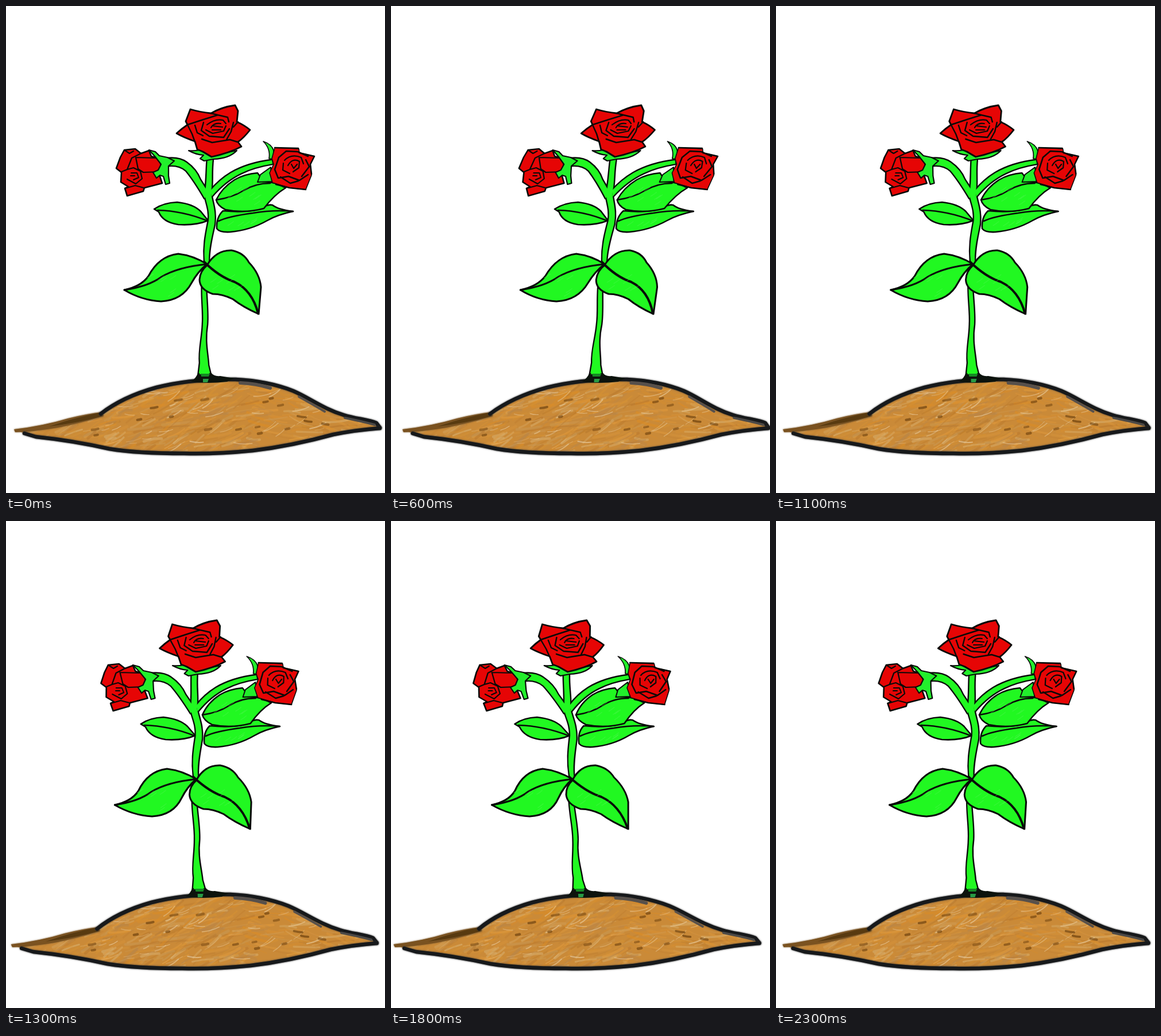
An HTML page with a canvas for the animation above (2400 ms loop, 660 px wide and 849 px high).

```html
<!DOCTYPE html>
<html lang="en">
<head>
<meta charset="utf-8">
<title>Swaying roses</title>
<style>
html, body { margin: 0; width: 100%; height: 100%; overflow: hidden; background: #fff; }
canvas { display: block; }
</style>
</head>
<body>
<canvas id="stage" width="660" height="849"></canvas>
<script>
const ctx = document.getElementById('stage').getContext('2d');
const W = 660, H = 849, LOOP = 2400, STEP = 100;
const GREEN = '#21f821', SEPAL = '#22ee2c', RED = '#e60505', INK = '#080a08';

// Sideways lean over time: [ms, shear]
const sway = [[0, 0], [300, .0393], [500, .0545], [600, .0545], [900, .014],
  [1300, -.047], [1700, -.088], [1800, -.086], [2300, -.0235]];

function key(i) {
  const n = sway.length, turn = Math.floor(i / n), [t, v] = sway[i - turn * n];
  return [t + turn * LOOP, v];
}

function slope(i) {
  const a = key(i - 1), b = key(i + 1);
  return (b[1] - a[1]) / (b[0] - a[0]);
}

function lean(t) {
  let i = 0;
  while (key(i + 1)[0] <= t) i++;
  const [t0, v0] = key(i), [t1, v1] = key(i + 1);
  const d = t1 - t0, u = (t - t0) / d, w = 1 - u;
  return v0 * w * w * (1 + 2 * u) + slope(i) * d * u * w * w
    + v1 * u * u * (3 - 2 * u) - slope(i + 1) * d * u * u * w;
}

function random(seed) {
  return () => (seed = (seed * 16807) % 2147483647) / 2147483647;
}

function stroke(d, width = 3, color = INK) {
  ctx.strokeStyle = color;
  ctx.lineWidth = width;
  ctx.stroke(new Path2D(d));
}

function fill(d, color) {
  ctx.fillStyle = color;
  ctx.fill(new Path2D(d));
}

function shape(d, color, width = 3) {
  fill(d, color);
  stroke(d, width);
}

function dash(x, y, len, angle, bend) {
  const c = Math.cos(angle) * len / 2, s = Math.sin(angle) * len / 2;
  ctx.beginPath();
  ctx.moveTo(x - c, y - s);
  ctx.quadraticCurveTo(x - s * bend, y + c * bend, x + c, y + s);
  ctx.stroke();
}

const ridge = 'M165 711 C192 690 222 676 262 665 C300 655 345 650 400 651 ' +
  'C440 653 470 659 500 671 C530 684 552 702 588 713 C610 720 632 721 645 727 L651 735';
const belly = 'M651 736 C625 738 600 741 570 747 C530 758 480 769 430 775 ' +
  'C390 779 350 781 310 780 C260 780 210 777 180 772 C140 763 100 756 52 751 L32 745';
const soil = 'M18 740 C65 731 105 720 165 711 ' + ridge.slice(8) + ' ' +
  belly.replace('M', 'L') + ' Z';
const clods = [[288, 716], [352, 738], [346, 686], [452, 690], [478, 696], [462, 684], [405, 738],
  [438, 734], [442, 745], [490, 737], [515, 716], [526, 724], [556, 729], [155, 738], [157, 748],
  [232, 721], [258, 700], [300, 687]];
const tints = ['#dc8c25', '#d69232', '#b9792d', '#c99a57', '#b7854a', '#e09a3c', '#d8b070'];

function mound() {
  const rnd = random(417);
  ctx.save();
  fill(soil, '#ca8a38');
  ctx.clip(new Path2D(soil));
  for (let i = 0; i < 620; i++) {
    const x = 30 + rnd() * 620, y = 655 + rnd() * 125;
    const tilt = x < 430 ? -.42 : .16;
    ctx.strokeStyle = tints[Math.floor(rnd() * tints.length)];
    ctx.globalAlpha = .2 + rnd() * .4;
    ctx.lineWidth = 1.5 + rnd() * 3.5;
    dash(x, y, 14 + rnd() * 34, tilt + (rnd() - .5) * .7, (rnd() - .5) * .5);
  }
  ctx.strokeStyle = '#f0dab4';
  for (let i = 0; i < 65; i++) {
    ctx.globalAlpha = .2 + rnd() * .35;
    ctx.lineWidth = .8 + rnd() * 1.4;
    dash(170 + rnd() * 400, 665 + rnd() * 107, 10 + rnd() * 22, -.3 + (rnd() - .5) * .9, .2);
  }
  ctx.strokeStyle = '#70430f';
  for (const [x, y] of clods) {
    ctx.globalAlpha = .5 + rnd() * .25;
    ctx.lineWidth = 3.5 + rnd() * 1.5;
    dash(x, y, 4 + rnd() * 11, x > 500 ? .15 : -.18, .1);
  }
  ctx.restore();

  ctx.save();
  ctx.shadowColor = '#7a5a30';
  ctx.shadowBlur = 3;
  fill('M14 738 Q65 732 108 719 Q140 711 168 708 L170 715 Q130 727 90 735 Q50 742 16 743 Z', '#7a5220');
  fill('M75 733 Q120 717 168 708 L168 715 Q125 727 75 733 Z', '#583a10');
  ctx.shadowColor = '#333';
  stroke(ridge, 6.5, '#17191b');
  stroke(belly, 6.5, '#17191b');
  ctx.restore();
  stroke('M408 657 Q435 658 460 666', 6, '#57504b');
  stroke('M510 681 Q535 695 555 707', 4, '#57504b');
  stroke('M590 718 Q620 724 642 730', 4, '#4b4947');
}

function sheen(x, y, w, h, n) {
  const rnd = random(x * 7 + y);
  ctx.strokeStyle = '#62f562';
  ctx.globalAlpha = .3;
  ctx.lineWidth = 1.3;
  for (let i = 0; i < n; i++) dash(x + rnd() * w, y + rnd() * h, 12, -.6, .1);
  ctx.globalAlpha = 1;
}

function leaf(edge, rib, width = 3, ribWidth = width) {
  shape(edge, GREEN, width);
  stroke(rib, ribWidth);
}

function leaves() {
  leaf('M367 388 Q366 368 378 357 Q420 361 444 353 Q455 345 464 347 Q474 355 500 358 ' +
    'Q472 364 455 374 Q425 391 390 394 Q372 395 367 388 Z',
    'M370 375 Q386 367 430 361 Q465 355 500 358', 2.6);
  leaf('M366 338 Q376 317 398 303 Q415 293 438 291 Q444 298 447 306 Q468 306 487 317 ' +
    'Q467 329 449 353 Q415 362 382 355 Q368 348 366 338 Z',
    'M366 338 Q394 334 413 322 Q434 309 460 309', 2.6);
  sheen(390, 315, 60, 30, 9);
  sheen(390, 370, 50, 12, 6);
  leaf('M258 354 Q274 343 298 342 Q326 345 339 358 L352 374 Q330 383 300 381 ' +
    'Q273 377 266 359 Z', 'M264 356 Q308 357 352 375', 2.6);
}

function lowLeaves() {
  leaf('M206 495 Q235 489 248 471 Q266 436 300 432 Q326 435 350 450 Q334 463 323 483 ' +
    'Q307 513 270 515 Q236 513 206 495 Z',
    'M206 495 Q248 489 271 472 Q300 455 350 450', 3);
  leaf('M350 452 Q366 425 393 426 Q414 430 423 447 Q442 467 444 490 L440 537 ' +
    'Q413 525 395 511 Q377 502 360 502 Q337 494 337 477 Q338 462 350 452 Z',
    'M345 446 Q371 472 398 481 Q429 496 439 536', 3, 4);
  sheen(250, 470, 55, 35, 8);
  sheen(360, 470, 50, 28, 8);
}

const stalks = [
  'M281 266 Q302 264 314 273 Q331 285 338 303 L352 325 L346 335 Q328 304 314 287 Q302 276 282 278 Z',
  'M356 322 Q372 303 392 291 Q422 274 463 269 L464 275 Q433 280 410 291 Q382 304 358 332 Z',
  'M351 266 C349 290 350 310 346 328 C349 345 355 355 353 374 C349 395 344 415 346 444 ' +
    'L343 470 C339 500 345 530 343 555 C342 580 336 600 338 622 L335 647 ' +
    'L357 647 L352 626 C351 605 345 586 350 555 C352 530 347 500 348 470 L353 444 ' +
    'C353 420 359 400 363 380 C366 355 358 340 357 326 C360 305 357 292 360 266 Z'
];

// All outlines go under all fills, so the joints stay open
function stems() {
  for (const d of stalks) stroke(d, 4.8);
  for (const d of stalks) fill(d, GREEN);
}

function foot() {
  fill('M322 655 Q331 649 334 640 L358 640 Q362 646 373 645 L397 649 L385 655 Q350 659 322 655 Z', '#0c130d');
  fill('M341 612 L349 612 L354 642 L337 642 Z', GREEN);
  fill('M339 641 L355 641 L353 646 L340 646 Z', '#168a25');
  fill('M343 650 L353 650 L351 656 L343 656 Z', '#299b45');
}

function topRose() {
  shape('M318 252 Q328 253 337 251 L356 262 L376 257 L402 252 Q389 266 361 267 L345 270 L338 266 L344 260 Q330 259 318 252 Z',
    SEPAL, 2.2);
  shape('M321 180 Q338 185 357 187 Q376 176 399 173 L404 183 L402 202 Q414 207 425 216 ' +
    'Q414 230 404 237 L410 245 Q390 256 358 263 L343 254 L333 250 L329 236 Q309 229 297 222 ' +
    'Q307 213 316 207 L313 201 Z', RED, 2.8);
  stroke('M316 207 Q343 198 369 190 L386 194 L388 202 M357 187 L369 190 M316 207 L324 223 L329 237 ' +
    'M329 208 L333 221 L343 226 M344 203 L340 217 L354 227 L379 229 L389 214 ' +
    'M341 232 L359 238 L390 233 L403 237 M396 203 L392 219 L384 233 M404 202 L396 211', 2.4);
  stroke('M350 207 Q364 196 378 199 L383 205 M357 212 Q362 203 374 205 M360 209 L377 211 ' +
    'M348 216 L360 222 L379 218 L383 209 M359 216 L374 216', 2.2);
}

function leftRose() {
  shape('M206 251 L225 249 L235 257 L249 252 L253 262 L267 266 L270 278 L266 291 L272 309 ' +
    'L241 317 L239 323 L211 331 L207 318 L213 315 L200 307 L201 290 L192 283 L199 264 Z', RED, 2.6);
  stroke('M206 251 L215 257 L222 253 M235 257 L219 265 L211 285 L201 289 M226 264 L263 265 ' +
    'M226 264 L230 284 L239 290 L267 289 M211 285 L222 282 L234 288 L237 301 L226 310 L211 302 ' +
    'M207 318 L225 313 L240 317', 2.2);
  stroke('M218 291 L228 291 L231 299 L222 303 M217 296 L224 296', 2);
  shape('M249 251 L260 254 L267 261 L281 264 L293 270 L283 279 L283 296 L285 309 L278 311 L274 297 ' +
    'L268 295 L262 300 L256 290 L265 286 L270 276 L260 263 Z', SEPAL, 2.2);
}

function rightRose() {
  shape('M448 236 Q463 241 466 252 L466 267 L458 266 Q461 249 448 236 Z', SEPAL, 1.7);
  shape('M461 281 L443 294 L438 307 L463 306 Z', SEPAL, 2);
  shape('M468 247 L510 249 L511 256 L537 262 L530 276 L532 295 L522 320 L494 317 L464 308 ' +
    'L459 291 L466 276 L463 266 Z', RED, 1.6);
  stroke('M468 247 L509 248 M511 256 L537 262 L530 276 L532 293 M522 320 L494 317 L470 311 ' +
    'M475 264 L488 253 L508 254 L526 262 M475 264 L468 285 L474 300 L492 297 L511 304 L526 294 ' +
    'M478 298 L495 309 L509 305 M522 268 L528 280 L515 297', 2.5);
  stroke('M485 269 Q497 257 514 264 L518 275 M483 274 L482 286 L494 292 M491 278 Q499 264 511 271 ' +
    'L510 282 L500 289 M497 276 L501 283 L507 276', 2.2);
}

function draw(t) {
  const k = lean(t);
  ctx.setTransform(1, 0, 0, 1, 0, 0);
  ctx.fillStyle = '#fff';
  ctx.fillRect(0, 0, W, H);
  ctx.setTransform(1, 0, -k, 1, k * H, 0);
  ctx.lineCap = ctx.lineJoin = 'round';
  mound();
  leaves();
  stems();
  lowLeaves();
  foot();
  topRose();
  leftRose();
  rightRose();
}

const start = performance.now();
let shown = -1;

function tick() {
  const t = Math.floor(((performance.now() - start) % LOOP) / STEP) * STEP;
  if (t !== shown) draw(shown = t);
  requestAnimationFrame(tick);
}
tick();
</script>
</body>
</html>
```
